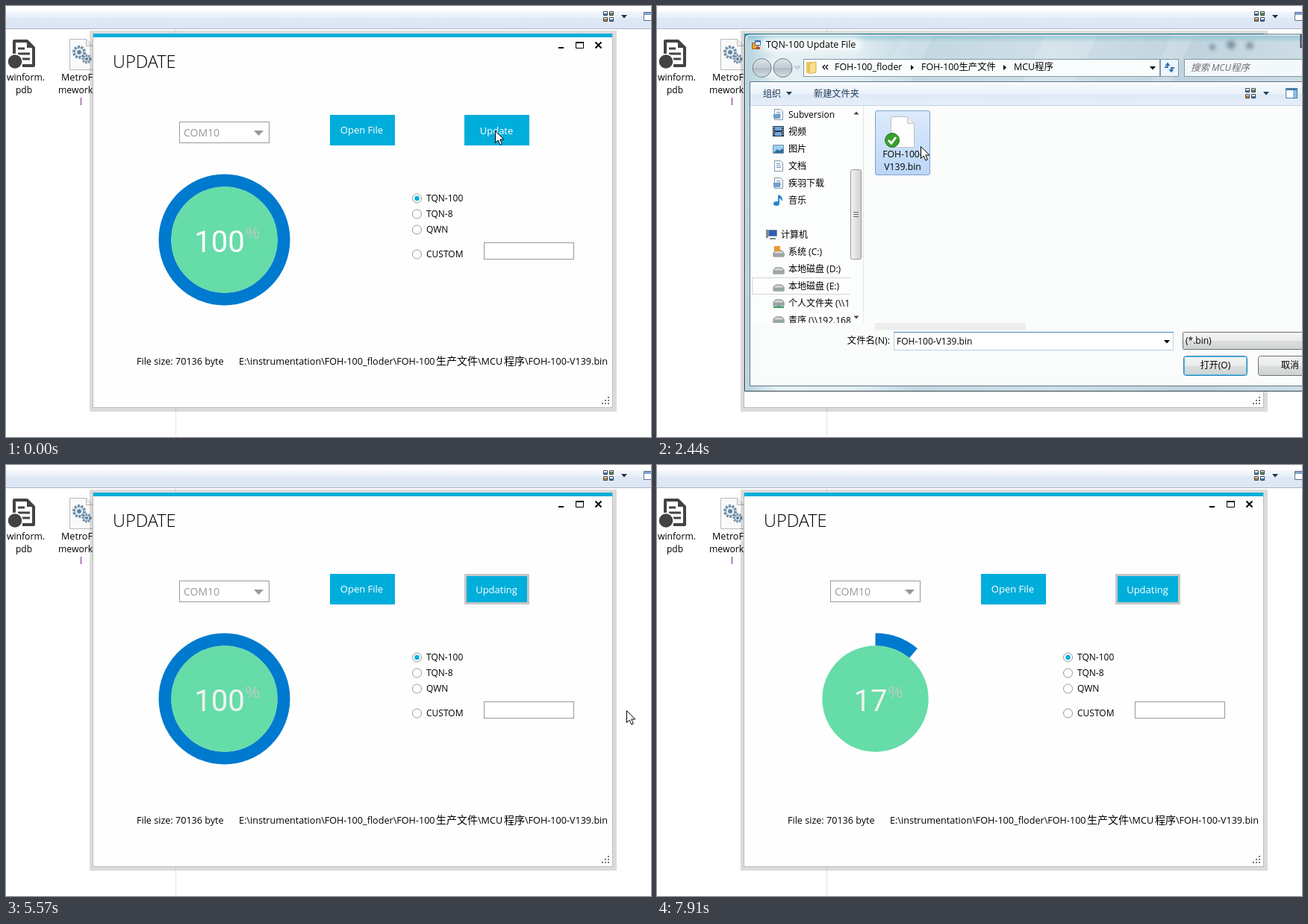
An HTML page that plays this animation: 864 by 578 pixels, repeating every 8000 ms.

```html
<!DOCTYPE html>
<html lang="en">
<head>
<meta charset="utf-8">
<title>Firmware update</title>
<style>
html, body { margin: 0; width: 100%; height: 100%; overflow: hidden; background: #fff; }
svg { display: block; width: 864px; height: 578px; }
text { font-family: "Open Sans", "Noto Sans CJK SC", "Noto Sans CJK", sans-serif; font-size: 12px; fill: #000; white-space: pre; }
.form text { font-size: 12.6px; }
.form .cjk { font-size: 14px; }
.form .cap { font-size: 13px; fill: #fff; text-anchor: middle; }
.nav text { font-size: 12.4px; }
.mid { text-anchor: middle; }
#value { font-family: Roboto, sans-serif; font-size: 40px; }
#percent { font-family: "Liberation Sans", Arial, sans-serif; font-size: 22px; fill: #bfc9c3; }
</style>
</head>
<body>
<svg viewBox="0 0 864 578" xmlns="http://www.w3.org/2000/svg">
<defs>
  <linearGradient id="bar" x2="0" y2="1">
    <stop offset="0" stop-color="#f3f7fc"/><stop offset=".35" stop-color="#e9f0f9"/>
    <stop offset=".4" stop-color="#dfe8f5"/><stop offset="1" stop-color="#dce6f4"/>
  </linearGradient>
  <linearGradient id="glass">
    <stop offset="0" stop-color="#b4d3dd"/><stop offset=".06" stop-color="#e4f0f4"/>
    <stop offset=".2" stop-color="#e0edf2"/><stop offset=".3" stop-color="#c3d8e2"/>
    <stop offset=".55" stop-color="#cfdfe8"/><stop offset=".8" stop-color="#c0d3de"/>
    <stop offset="1" stop-color="#cddde6"/>
  </linearGradient>
  <linearGradient id="tint" x2="0" y2="1">
    <stop offset="0" stop-color="#6fb7cb" stop-opacity=".55"/><stop offset="1" stop-color="#6fb7cb" stop-opacity="0"/>
  </linearGradient>
  <linearGradient id="tools" x2="0" y2="1">
    <stop offset="0" stop-color="#f8fbfe"/><stop offset=".5" stop-color="#e9f1f9"/>
    <stop offset=".55" stop-color="#dfe9f5"/><stop offset="1" stop-color="#e6eef8"/>
  </linearGradient>
  <linearGradient id="btn" x2="0" y2="1">
    <stop offset="0" stop-color="#f3f4f4"/><stop offset=".48" stop-color="#ebecec"/>
    <stop offset=".52" stop-color="#dcdedf"/><stop offset="1" stop-color="#cfd2d3"/>
  </linearGradient>
  <linearGradient id="thumb">
    <stop offset="0" stop-color="#f4f4f4"/><stop offset=".5" stop-color="#e2e2e3"/><stop offset="1" stop-color="#cfcfd1"/>
  </linearGradient>
  <linearGradient id="pick" x2="0" y2="1">
    <stop offset="0" stop-color="#dceafc"/><stop offset="1" stop-color="#bcd6f7"/>
  </linearGradient>
  <linearGradient id="orb" x2="0" y2="1">
    <stop offset="0" stop-color="#dde4e8"/><stop offset=".48" stop-color="#c3cdd3"/>
    <stop offset=".52" stop-color="#b0bdc5"/><stop offset="1" stop-color="#d5dfe5"/>
  </linearGradient>
  <filter id="blur" x="-50%" y="-50%" width="200%" height="200%"><feGaussianBlur stdDeviation="2.5"/></filter>
  <filter id="glow" x="-20%" y="-80%" width="140%" height="260%"><feGaussianBlur stdDeviation="5"/></filter>
  <clipPath id="side"><rect x="126" y="134" width="133" height="291"/></clipPath>
  <g id="tiles">
    <path d="M.5.5h5v5h-5zM8.5.5h5v5h-5zM.5 8.5h5v5h-5zM8.5 8.5h5v5h-5z" fill="#fff" stroke="#3b4652"/>
    <path d="M1 3h4v2H1zM9 11h4v2H9z" fill="#3c74b8"/><path d="M9 2h4v3H9z" fill="#5a8c4a"/><path d="M1 10h4v3H1z" fill="#b5803c"/>
  </g>
  <path id="down" d="M-4-2h8L0 2.5z"/>
  <g id="drive">
    <path d="M1 6l3-3h8l3 3v5H1z" fill="#d5d8da" stroke="#777"/><path d="M1 6.500h14v4H1z" fill="#9da3a8"/><path d="M11 8h3v1h-3z" fill="#5fd05a"/>
  </g>
  <g id="sheet">
    <path d="M2.5.5h8l3 3v11h-11z" fill="#f6fafd" stroke="#8798a8"/><path d="M5 4.500h5M5 7h6M5 9.500h6" stroke="#6b95bd"/>
  </g>
</defs>

<!-- desktop -->
<rect width="864" height="578" fill="#fff"/>
<rect y="7" width="864" height="23" fill="url(#bar)"/>
<path d="M0 30.500h864" stroke="#a9b5c6"/>
<path d="M227.500 31v547" stroke="#e3e6ea"/>
<use href="#tiles" x="800" y="7"/>
<use href="#down" x="828" y="14" fill="#1e2f4d"/>
<path d="M854.500 8.500h12v11h-12z" fill="#fff" stroke="#61718a"/><path d="M855 10.500h10" stroke="#7fa6d6" stroke-width="3"/>
<path d="M11 68V47h17l9 9v24H22" fill="none" stroke="#434343" stroke-width="4" stroke-linejoin="round"/>
<path d="M28 46v10h10z" fill="#434343"/>
<path d="M16 57h9M16 64h16M19 71h13" stroke="#434343" stroke-width="3"/>
<circle cx="12" cy="74.500" r="10" fill="#434343" stroke="#fff" stroke-width="1.500"/>
<text x="52" y="100" text-anchor="end" style="font-size:12.2px">.winform.</text>
<text x="24" y="117" class="mid">pdb</text>
<path d="M85.500 44.500h22l9 9v32h-31z" fill="#fafafa" stroke="#b9b9b9"/><path d="M107.500 44.500v9h9" fill="#eee" stroke="#b9b9b9"/>
<g fill="#e3edf5" stroke="#6d8ba4">
  <circle cx="98" cy="62" r="7" stroke-width="4" stroke-dasharray="2.800 1.600"/><circle cx="98" cy="62" r="6"/><circle cx="98" cy="62" r="2.500" fill="#5f7f9a"/>
  <circle cx="108" cy="71" r="5" stroke-width="3" stroke-dasharray="2.200 1.400"/><circle cx="108" cy="71" r="4"/><circle cx="108" cy="71" r="1.800" fill="#5f7f9a"/>
</g>
<text x="74" y="100" style="font-size:12.6px">MetroFra</text><text x="70" y="117" style="font-size:12.2px">mework.dl</text>
<text x="99" y="133" style="fill:#7a1f8c">l</text>

<!-- main window -->
<rect x="112" y="33" width="706" height="511" fill="#000" opacity=".14"/>
<rect x="116.500" y="37.500" width="696" height="501" fill="#fefefe" stroke="#bcbcbc"/>
<rect x="117" y="37" width="695" height="5" fill="#00aedb"/>
<g fill="none" stroke="#000" stroke-width="2">
  <path d="M740 56h7M763 49h11M789.500 48.500l8 8M797.500 48.500l-8 8"/><path d="M763.500 48.500h10v8h-10z" stroke-width="1"/>
</g>
<g class="form">
  <text x="143" y="83" style="font-size:23.5px;font-weight:300">UPDATE</text>
  <rect x="232.500" y="155.500" width="120" height="28" fill="#fff" stroke="#999"/>
  <text x="238" y="175" style="font-size:14px;fill:#999">COM10</text>
  <path d="M332 167h13l-6.500 7z" fill="#999"/>
  <rect x="434" y="146" width="87" height="41" fill="#00aedb"/>
  <rect x="614" y="146" width="87" height="41" fill="#00aedb"/>
  <g fill="none" stroke="#c6c6c6" stroke-width="3">
    <rect id="focusOpen" x="435.500" y="147.500" width="84" height="38"/>
    <rect id="focusUpdate" x="615.500" y="147.500" width="84" height="38"/>
  </g>
  <text class="cap" x="476.500" y="171">Open File</text>
  <text class="cap" id="action" x="657" y="172">Update</text>
  <text x="175" y="481">File size: 70136 byte</text>
  <text x="312" y="481">E:\instrumentation\FOH-100_floder\FOH-100</text>
  <text class="cjk" x="576" y="481">生产文件</text>
  <text x="632" y="481">\MCU</text>
  <text class="cjk" x="667" y="481">程序</text>
  <text x="695" y="481">\FOH-100-V139.bin</text>
</g>
<circle id="ring" cx="292.500" cy="313.500" r="79.500" fill="none" stroke="#007ace" stroke-width="17" pathLength="100" transform="rotate(-90 292.500 313.500)"/>
<circle cx="292.500" cy="313.500" r="71.200" fill="#66dca8"/>
<text id="value" class="mid" x="286" y="330"></text>
<text id="percent" y="312">%</text>
<g id="radios"></g>
<circle cx="550.500" cy="258" r="3.200" fill="#00aedb"/>
<rect x="640.500" y="317.500" width="120" height="22" fill="#fff" stroke="#999"/>
<path d="M806 524h2v2h-2zM802 528h2v2h-2zM806 528h2v2h-2zM798 532h2v2h-2zM802 532h2v2h-2zM806 532h2v2h-2z" fill="#777"/>

<!-- file dialog -->
<g id="dialog">
  <path d="M117.500 516.500V44q0-6 6-6H870v478.500z" fill="url(#glass)" stroke="#33444f"/>
  <path d="M118.500 515.500V45q0-6 6-6H870" fill="none" stroke="#eef8fb"/>
  <path d="M330 39h40l-30 62h-40zM520 39h70l-30 62h-70zM690 39h30l-30 62h-30z" fill="#fff" opacity=".14"/>
  <rect x="122" y="40" width="742" height="9" fill="url(#tint)"/>
  <g filter="url(#blur)" fill="#5f7480" opacity=".65"><circle cx="744" cy="55" r="4"/><circle cx="769" cy="52" r="6"/><circle cx="794" cy="53" r="5"/></g>
  <rect x="140" y="43" width="134" height="17" rx="8" fill="#fff" opacity=".8" filter="url(#glow)"/>
  <path d="M862.500 38v17h3" fill="none" stroke="#33444f" stroke-width="2"/>
  <path d="M127.500 49.500h8v8h-8z" fill="#e8a33a" stroke="#8a6420"/><path d="M131.500 46.500h7v6h-7z" fill="#fff" stroke="#3d6ca8"/><path d="M132 47.500h7" stroke="#3d6ca8" stroke-width="2"/><path d="M133 55h5v3h-5z" fill="#c8452f"/>
  <text x="146" y="56" style="font-size:12.5px">TQN-100 Update File</text>
  <g class="nav">
    <rect x="127" y="70" width="55" height="26" rx="13" fill="#eef5f8" opacity=".6"/>
    <g fill="url(#orb)" stroke="#6b7c86"><circle cx="140.500" cy="83" r="12.500"/><circle cx="168.500" cy="83" r="12.500"/></g>
    <path d="M184 81h8l-4 4z" fill="#dfe8ec" stroke="#8296a2" stroke-width=".6"/>
    <rect x="196.500" y="71.500" width="477" height="23" fill="#fafdfe" stroke="#7f98a6"/>
    <rect x="674.500" y="71.500" width="24" height="23" fill="#eef6fa" stroke="#7f98a6"/>
    <rect x="706.500" y="71.500" width="170" height="23" fill="#f3f8fa" stroke="#7f98a6"/>
    <path d="M200 75h8v15h-8z" fill="#f0c95c"/><path d="M204 77l9-2v14l-9 2z" fill="#f8df8e" stroke="#cfa136" stroke-width=".8"/>
    <path d="M225 79l-3 3 3 3M229 79l-3 3 3 3" fill="none" stroke="#000" stroke-width="1.300"/>
    <text x="238" y="86">FOH-100_floder</text><text x="354" y="86">FOH-100生产文件</text><text x="478" y="86">MCU程序</text>
    <path d="M340 79l4 3.500-4 3.500zM464 79l4 3.500-4 3.500z"/>
    <use href="#down" x="664" y="83"/>
    <path d="M680 82h4v-4m-2.500 2l2.500-3 2.500 3M693 83h-4v4m-2.500-2l2.500 3 2.500-3" fill="none" stroke="#2e74b5" stroke-width="1.800"/>
    <text x="715" y="87" style="font-style:italic;fill:#6d6d6d">搜索 MCU程序</text>
  </g>
  <path d="M124.500 101.500H870v408H124.500z" fill="#fafcfc" stroke="#5f7886"/>
  <rect x="125" y="102" width="740" height="31" fill="url(#tools)"/>
  <path d="M125 133.500h740" stroke="#c3d2e3"/>
  <text x="142" y="122" style="fill:#1e395b">组织</text><text x="210" y="122" style="fill:#1e395b;font-size:12.2px">新建文件夹</text>
  <use href="#down" x="177" y="117" fill="#1e395b"/>
  <use href="#tiles" x="788" y="110"/>
  <use href="#down" x="816" y="117" fill="#1e395b"/>
  <path d="M842.500 110.500h15v13h-15z" fill="#fff" stroke="#4b78a8"/><path d="M852 111h5v12h-5z" fill="#8bbde6"/><path d="M843 112h14" stroke="#4b78a8" stroke-width="2"/>
  <rect x="126" y="134" width="150" height="291" fill="#fcfdfd"/>
  <path d="M276.500 134v291" stroke="#dfe8f2"/>
  <g clip-path="url(#side)">
    <path d="M127 364.500h131.500M127 386.500h131.500M127.500 365v21" stroke="#d5d5d5" fill="none"/>
    <g id="tree"></g>
    <use href="#sheet" x="155" y="138"/><use href="#sheet" x="155" y="207"/><use href="#sheet" x="155" y="230"/>
    <path d="M156 145h9v6h-9zM156 237h9v6h-9z" fill="#6f9fc8"/>
    <path d="M155 161h15v14h-15z" fill="#2b3a4a"/><path d="M158 162h9v5h-9zM158 169h9v5h-9z" fill="#6fa8dc"/><path d="M156.500 162v12M168.500 162v12" stroke="#fff" stroke-dasharray="1.500 1.500"/>
    <path d="M155.500 186.500h14v11h-14z" fill="#9cd0f0" stroke="#7b8fa0"/><path d="M156 197l5-5 3 2 5-3v6z" fill="#2d6c9e"/>
    <path d="M163 254v11" stroke="#2a86d0" stroke-width="2"/><path d="M163 253q6 3 5 9-2-4-5-4z" fill="#2a86d0"/><ellipse cx="160" cy="265" rx="4" ry="3" fill="#2a86d0"/>
    <path d="M149.500 300.500h11v8h-11z" fill="#2a5fb8" stroke="#8592a0"/><path d="M146 300h3v11h-3zM151 311h8v2h-8z" fill="#7d8894"/>
    <use href="#drive" x="155" y="325"/><rect x="157" y="322" width="8" height="7" fill="#e69b35"/>
    <use href="#drive" x="155" y="348"/><use href="#drive" x="155" y="371"/><use href="#drive" x="155" y="391"/><use href="#drive" x="155" y="414"/>
    <path d="M156 404h14M163 401v3" stroke="#3f9c6a" stroke-width="2"/>
  </g>
  <path d="M263.500 145.500l3.500-4 3.500 4zM263.500 415.500l3.500 4 3.500-4z" fill="#444"/>
  <rect x="259.500" y="219.500" width="14" height="120" rx="2" fill="url(#thumb)" stroke="#979797"/>
  <path d="M263 276.500h7M263 279.500h7M263 282.500h7" stroke="#666"/>
  <rect x="277" y="134" width="590" height="291" fill="#fbfdfc"/>
  <rect id="strip" x="292" y="425" width="202" height="10" fill="#eee"/>
  <rect id="pickBox" x="292.500" y="140.500" width="73" height="86" rx="2.500" fill="url(#pick)" stroke="#7da2ce"/>
  <path d="M313.500 148.500h22l9 9v32h-31z" fill="#fdfdfd" stroke="#c2c2c2"/><path d="M335.500 148.500v9h9" fill="#eee" stroke="#c2c2c2"/>
  <circle cx="315" cy="180" r="9.500" fill="#3a9f2c" stroke="#267a1c"/><path d="M310 180l4 4 6-8" fill="none" stroke="#fff" stroke-width="2.800"/>
  <text x="329" y="203" class="mid" style="font-size:12.2px">FOH-100-</text><text x="329" y="220" class="mid" style="font-size:12.2px">V139.bin</text>
  <text x="312" y="453" text-anchor="end" style="font-size:12.4px">文件名(N):</text>
  <path d="M317.500 437.500h374v24h-374z" fill="#fff" stroke="#b9d0e4"/><path d="M317 437.500h375" stroke="#4d86b5"/>
  <text id="fileName" x="321" y="454">FOH-100-V139.bin</text>
  <use href="#down" x="683" y="450"/>
  <rect x="704.500" y="437.500" width="180" height="23" rx="1" fill="url(#btn)" stroke="#707070"/>
  <text x="708" y="453">(*.bin)</text>
  <rect x="705.500" y="469.500" width="85" height="26" rx="3" fill="url(#btn)" stroke="#3c7fb1"/>
  <rect x="706.500" y="470.500" width="83" height="24" rx="2" fill="none" stroke="#48c4ee"/>
  <text x="748" y="486" class="mid">打开(O)</text>
  <rect x="805.500" y="469.500" width="85" height="26" rx="3" fill="url(#btn)" stroke="#707070"/>
  <text x="836" y="486">取消</text>
</g>
<path id="cursor" d="M.5.5v16l3.700-3.500 2.600 6 2.600-1.100-2.600-5.900h5z" fill="#fff" stroke="#000"/>
</svg>
<script>
const $ = id => document.getElementById(id);
const LOOP = 8000;

$('radios').innerHTML = [['TQN-100', 258], ['TQN-8', 279], ['QWN', 300], ['CUSTOM', 333]].map(([label, y]) =>
  `<circle cx="550.5" cy="${y}" r="6" fill="#fff" stroke="#999"/><text x="563" y="${y + 4}">${label}</text>`).join('');

const tree = ['Subversion', '视频', '图片', '文档', '疾羽下载', '音乐', '', '计算机', '系统 (C:)',
  '本地磁盘 (D:)', '本地磁盘 (E:)', '个人文件夹 (\\\\192', '青序 (\\\\192.168'];
$('tree').innerHTML = tree.map((label, i) =>
  `<text x="${i === 7 ? 166 : 176}" y="${150 + i * 23}">${label}</text>`).join('');

// Pointer stops: time, x, y
const stops = [
  [0, 655, 167], [500, 640, 174], [640, 575, 176], [780, 505, 168], [920, 480, 157], [1350, 479, 155],
  [1860, 440, 172], [1980, 385, 188], [2130, 356, 189], [2440, 353, 188], [2590, 390, 230],
  [2720, 520, 340], [2860, 660, 440], [2990, 742, 478], [3130, 738, 430], [3260, 695, 240], [3400, 674, 166],
  [3800, 690, 190], [3930, 740, 262], [4060, 790, 330], [4190, 811, 352],
  [4590, 818, 345], [4720, 828, 335], [4860, 835, 330], [5140, 833, 329], [5290, 831, 329]
];
// Screen refreshes while the progress runs
const ticks = [5570, 5710, 5850, 5990, 6140, 6280, 6420, 6560, 6710, 6860,
  7000, 7130, 7270, 7400, 7540, 7670, 7790, 7910];

const show = (id, on) => $(id).style.display = on ? '' : 'none';
const clamp = (v, a, b) => Math.max(a, Math.min(b, v));

function progress(t) {
  if (t < 5710) return { value: 100, arc: 100 };
  const now = ticks.filter(k => k <= t).pop();
  if (now < 6600) return { value: 0, arc: clamp(100 - (now - 5570) / 7, 0, 100) };
  return { value: Math.round(4 + (now - 6860) / 80.8), arc: Math.max(0, (now - 6745) * 0.0095) };
}

function draw(t) {
  const [, x, y] = stops.filter(s => s[0] <= t).pop();
  $('cursor').setAttribute('transform', `translate(${x} ${y})`);
  show('cursor', t < 6420);

  show('focusOpen', t >= 920 && t < 3400);
  show('focusUpdate', t >= 3400);
  $('action').textContent = t < 5570 ? 'Update' : 'Updating';

  show('dialog', t >= 1590 && t < 3130);
  show('strip', t >= 1860);
  show('pickBox', t >= 1980);
  show('fileName', t >= 2130);

  const { value, arc } = progress(t);
  const label = String(value);
  $('value').textContent = label;
  $('value').style.fill = t < 3130 ? '#fff' : '#f0f3f1';
  $('percent').setAttribute('x', 287.2 + 11.1 * label.length);
  $('ring').setAttribute('stroke-dasharray', arc >= 100 ? 'none' : `${arc} 100`);
  show('ring', arc > 0);
}

const start = performance.now();
function loop() {
  draw((performance.now() - start) % LOOP);
  requestAnimationFrame(loop);
}
draw(0);
requestAnimationFrame(loop);
</script>
</body>
</html>
```
